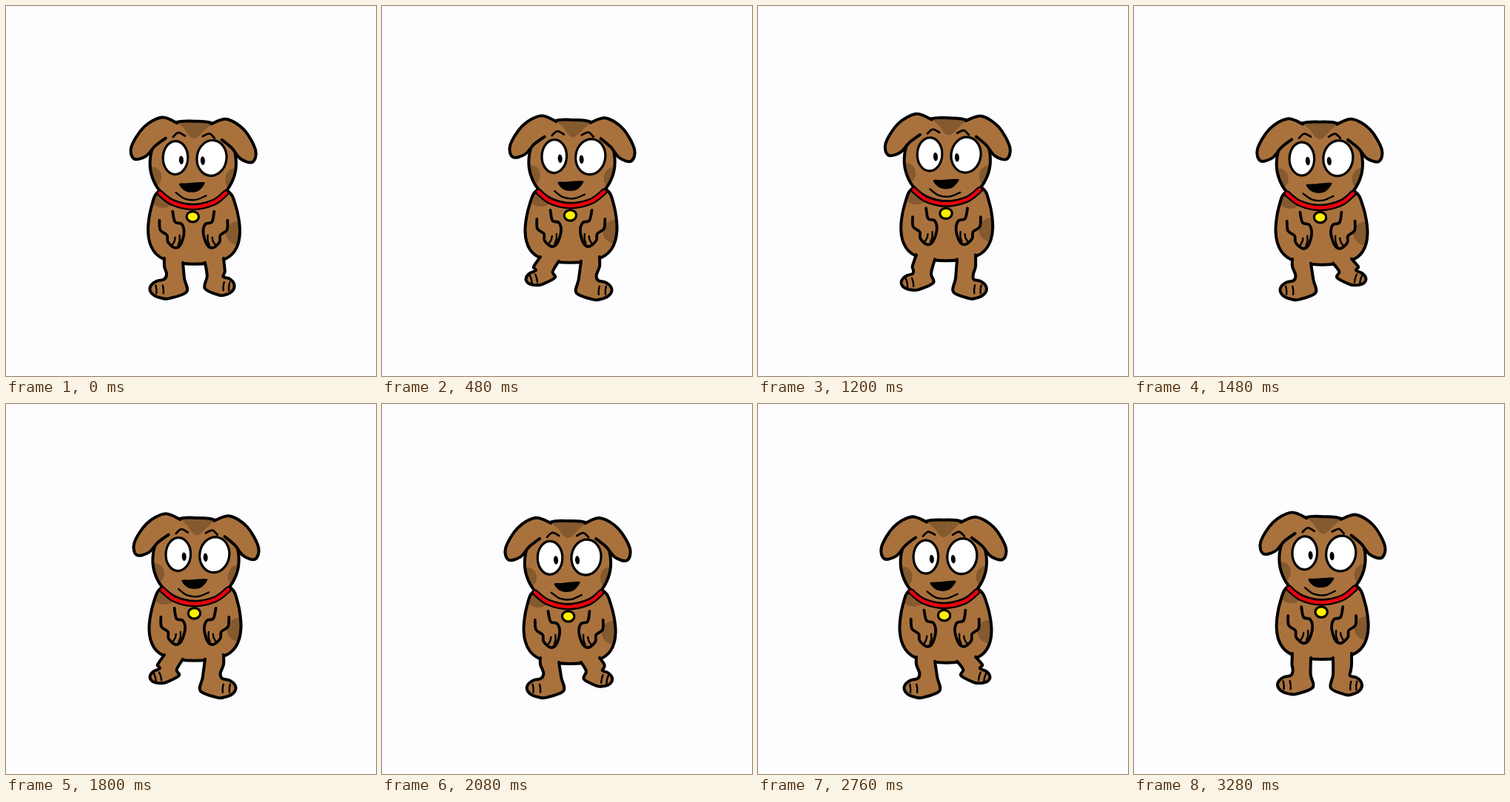
Animation, 500 px wide and 500 px high, one loop 3.32 s. Source, as an HTML page with a canvas:

```html
<!DOCTYPE html>
<html lang="en">
<head>
<meta charset="utf-8">
<title>Walking dog</title>
<style>
html, body { margin: 0; width: 100%; height: 100%; overflow: hidden; background: #fdfcff; }
canvas { display: block; width: 500px; height: 500px; }
</style>
</head>
<body>
<canvas id="stage" width="500" height="500"></canvas>
<script>
const ctx = document.getElementById('stage').getContext('2d');
const LOOP = 3320, STRIDES = 5, POSES = 10;
const NECK = { x: 253, y: 245 };
const FUR = '#a9723d', PATCH = '#845a2e', INK = '#000', PAPER = '#fdfcff';

const pts = s => s.split(' ').map(p => p.split(',').map(Number));
const mirror = list => list.map(([x, y]) => [-x, y]);
const wave = (pose, peak) => Math.cos(2 * Math.PI * (pose - peak) / POSES);

// Smooth curve through the given points
function curve(list, closed = false) {
  const path = new Path2D(), n = list.length;
  const at = i => closed ? list[(i + n) % n] : list[Math.max(0, Math.min(n - 1, i))];
  path.moveTo(...list[0]);
  for (let i = 0; i < (closed ? n : n - 1); i++) {
    const [a, b, c, d] = [at(i - 1), at(i), at(i + 1), at(i + 2)];
    path.bezierCurveTo(b[0] + (c[0] - a[0]) / 6, b[1] + (c[1] - a[1]) / 6,
      c[0] - (d[0] - b[0]) / 6, c[1] - (d[1] - b[1]) / 6, c[0], c[1]);
  }
  if (closed) path.closePath();
  return path;
}

// Closed outline from its left half, listed from top centre to bottom centre
function symmetric(s) {
  const half = pts(s);
  return curve([...half, ...mirror(half.slice(1, -1)).reverse()], true);
}
function pair(s) {
  const list = pts(s);
  return [curve(list), curve(mirror(list))];
}
function oval(x, y, rx, ry, turn = 0) {
  const path = new Path2D();
  path.ellipse(x, y, rx, ry, turn, 0, 2 * Math.PI);
  return path;
}

// All shapes are measured from the neck
const body = symmetric('0,-3 -44,3 -57,25 -62,60 -55,85 -37,98 0,103');
const skull = symmetric('0,-90 -24,-88 -46,-73 -56,-50 -58,-28 -53,-9 -43,6 -25,18 0,23');
const ears = pair('-23,-87 -44,-94 -68,-80 -84,-53 -80,-37 -64,-41 -52,-55 -38,-66');
const brows = pair('-28,-68 -21,-74 -12,-70');
const arms = pair('-46,44 -45,57 -36,64 -35,73 -26,81 -18,77 -13,61 -16,49 -25,46 -28,32');
const fingers = [...pair('-25,67 -26,72 -29,77'), ...pair('-19,64 -19,71 -21,77')];
const wedge = curve(pts('-21,-91 22,-91 12,-76 2,-67 -5,-69 -12,-78'), true);
const nose = curve(pts('-18,-5 -8,-6 14,-8 16,-5 8,4 -3,6 -12,3'), true);
const mouth = curve(pts('-22,7 -10,15 5,16 19,10'));
const collar = curve(pts('-44,7 -27,20 0,26 28,20 45,7'));

function stroke(path, width = 4, colour = INK) {
  ctx.strokeStyle = colour;
  ctx.lineWidth = width;
  ctx.stroke(path);
}
function fill(path, colour) {
  ctx.fillStyle = colour;
  ctx.fill(path);
}
function outlined(path, colour, width) {
  fill(path, colour);
  stroke(path, width);
}
function furry(path, patches) {
  fill(path, FUR);
  ctx.save();
  ctx.clip(path);
  patches.forEach(p => fill(p, PATCH));
  ctx.restore();
  stroke(path);
}
function within(matrix, work) {
  ctx.save();
  ctx.transform(...matrix);
  work();
  ctx.restore();
}

// Left leg: the heel travels, the foot hangs on it, the knee bends with the lift
function drawLeg(pose, drop) {
  const reach = wave(pose, 1.5);
  const lift = Math.max(0, wave(pose, 6.9)) ** 2;
  const hx = -11 + 3.5 * reach - 5 * lift;
  const hy = 139 + 4 * Math.max(0, reach) - 17 * lift;
  const length = 45 + 5 * wave(pose, 0.5) - 3 * lift;
  const turn = -0.18 * lift, cos = Math.cos(turn), sin = Math.sin(turn);
  const onFoot = (x, y) => [hx + x * cos - y * sin, hy + x * sin + y * cos];

  const hipOut = [-39, 95 + drop], hipIn = [-14, 101 + drop];
  const line = [hipOut, [-39 - 9 * lift, 107], [hx - 27, hy - 24 + 12 * lift]];
  for (let deg = 262; deg >= 80; deg -= 26) {
    const a = deg * Math.PI / 180;
    line.push(onFoot(length * (-0.55 + 0.45 * Math.cos(a)), -4 + (13 - 3 * lift) * Math.sin(a)));
  }
  line.push([hx, hy], [hx - 3, hy - 18 + 10 * lift], hipIn);

  const inside = curve(line);
  inside.lineTo(hipIn[0], hipIn[1] - 6);
  inside.lineTo(hipOut[0], hipOut[1] - 6);
  fill(inside, FUR);
  stroke(curve(line));
  for (const part of [0.84, 0.65]) {
    const x = -part * length;
    stroke(curve([onFoot(x, -9), onFoot(x + 1, -4), onFoot(x + 1, 2)]), 2.4);
  }
}

function drawEye(x, y, rx, ry, turn, px) {
  outlined(oval(x, y, rx, ry, turn), '#fff', 3.2);
  fill(oval(px, -37, 3, 5.8, -0.1), INK);
}

function drawHead() {
  furry(skull, [wedge, oval(-55, -13, 13, 14), oval(57, -13, 13, 15)]);
  ears.forEach(ear => outlined(ear, FUR));
  drawEye(-24, -40, 16.8, 22.5, 0, -16);
  drawEye(25, -41, 20, 24, 0.12, 13);
  brows.forEach(brow => stroke(brow, 2.8));
  fill(nose, INK);
  stroke(mouth, 2.4);
}

function drawCollar() {
  stroke(collar, 9);
  stroke(collar, 4.6, '#e8040c');
  outlined(oval(0, 39, 8.2, 7.2), '#fff000', 3.2);
}

function draw(time) {
  const pose = Math.floor(time / LOOP * STRIDES * POSES + 0.5) % POSES;
  const sway = -2.4 * wave(pose, 1.7);
  const drop = 2.4 * wave(2 * pose, 1.8) + 1.5 * wave(pose, 2.6) - 0.2;
  const tilt = (2 - 2 * Math.max(0, wave(pose, 1.5)) ** 3) * Math.PI / 180;
  const lean = [1, 0, -sway / 100, 1, sway, drop];

  ctx.setTransform(1, 0, 0, 1, 0, 0);
  fill(oval(250, 250, 400, 400), PAPER);
  ctx.translate(NECK.x, NECK.y);
  ctx.lineCap = ctx.lineJoin = 'round';

  within([1, 0, 0, 1, 1.5, 0], () => within(lean, () =>
    furry(body, [oval(-42, 16, 15, 11), oval(60, 61, 17, 16)])));
  drawLeg(pose, drop);
  within([-1, 0, 0, 1, 2, 0], () => drawLeg((pose + POSES / 2) % POSES, drop));
  within([1, 0, 0, 1, 1, 0], () => within(lean, () => {
    arms.forEach(arm => stroke(arm, 3.8));
    fingers.forEach(finger => stroke(finger, 2.4));
  }));
  const c = Math.cos(tilt), s = Math.sin(tilt);
  within([c, s, -s, c, sway, drop], drawHead);
  within(lean, drawCollar);
}

const start = performance.now();
function tick() {
  draw((performance.now() - start) % LOOP);
  requestAnimationFrame(tick);
}
tick();
</script>
</body>
</html>
```
